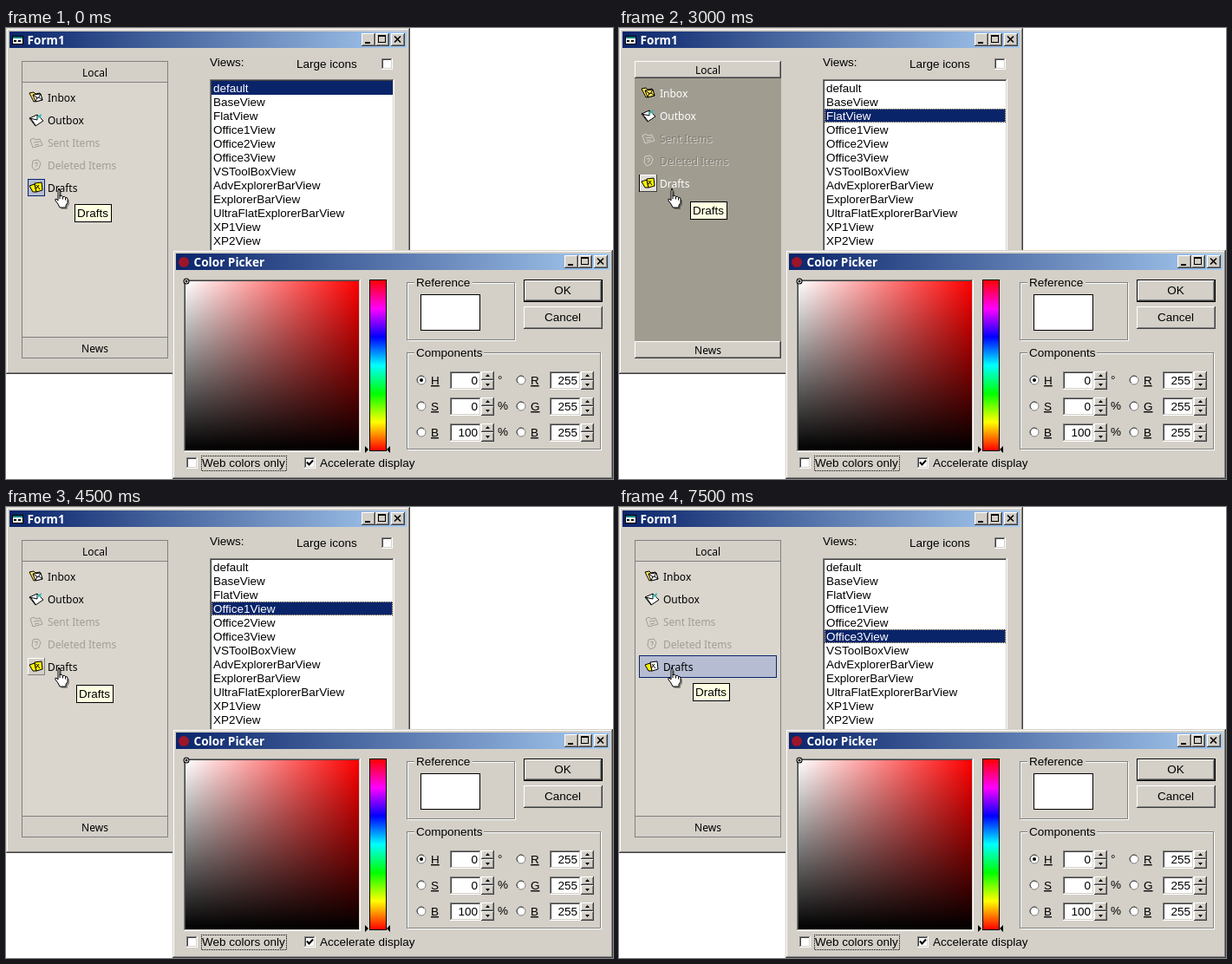
An HTML page for the animation above (8000 ms loop, 700 by 520 pixels).

```html
<!DOCTYPE html>
<html lang="en">
<head>
<meta charset="utf-8">
<title>Sidebar views</title>
<style>
html, body { margin: 0; width: 100%; height: 100%; overflow: hidden; background: #fff; }
svg { display: block; width: 700px; height: 520px; }
rect { shape-rendering: crispEdges; }
text { font: 13.5px "Liberation Sans", Arial, sans-serif; white-space: pre; }
.title { font: bold 13.6px "Noto Sans", sans-serif; fill: #fff; }
.side { font: 12px "Noto Sans", sans-serif; }
.state { visibility: hidden; animation: slot 8s step-end infinite; }
.state:last-child { animation-name: tail; }
@keyframes slot { 0% { visibility: visible } 18.75%, 100% { visibility: hidden } }
@keyframes tail { 0% { visibility: visible } 6.25%, 100% { visibility: hidden } }
</style>
</head>
<body>
<svg id="stage" viewBox="0 0 700 520">
  <defs>
    <linearGradient id="bar"><stop stop-color="#0a246a"/><stop offset="1" stop-color="#a6caf0"/></linearGradient>
    <linearGradient id="red"><stop stop-color="#fff"/><stop offset="1" stop-color="#f00"/></linearGradient>
    <linearGradient id="dark" x2="0" y2="1"><stop stop-opacity="0"/><stop offset="1"/></linearGradient>
    <linearGradient id="hue" x2="0" y2="1"></linearGradient>
    <pattern id="dots" width="2" height="2" patternUnits="userSpaceOnUse">
      <path d="M0 0h1v1h-1ZM1 1h1v1h-1Z"/>
    </pattern>
    <pattern id="focusDots" width="2" height="2" patternUnits="userSpaceOnUse">
      <path d="M0 0h1v1h-1ZM1 1h1v1h-1Z" fill="#f5db95"/>
    </pattern>
  </defs>
  <g id="form"></g>
  <g id="states"></g>
  <g id="picker"></g>
</svg>
<script>
const FACE = '#d4d0c8', GREY = '#808080', DARK = '#404040', NAVY = '#0a246a', BLACK = '#000', WHITE = '#fff';
const byId = id => document.getElementById(id);

const rect = (x, y, w, h, fill) =>
  `<rect x="${x}" y="${y}" width="${w}" height="${h}" fill="${fill}"/>`;
const path = (d, fill, stroke = 'none', extra = '') =>
  `<path d="${d}" fill="${fill}" stroke="${stroke}" ${extra}/>`;
const circle = (x, y, r, fill, stroke = 'none') =>
  `<circle cx="${x}" cy="${y}" r="${r}" fill="${fill}" stroke="${stroke}"/>`;
const text = (x, y, s, extra = '') => `<text x="${x}" y="${y}" ${extra}>${s}</text>`;
const centred = (x, y, s, extra = '') => text(x, y, s, `text-anchor="middle" ${extra}`);
const at = (x, y, content) => `<g transform="translate(${x} ${y})">${content}</g>`;
const outline = (x, y, w, h, stroke, fill = 'none') => rect(x, y, w, h, fill) +
  rect(x, y, w, 1, stroke) + rect(x, y + h - 1, w, 1, stroke) +
  rect(x, y + 1, 1, h - 2, stroke) + rect(x + w - 1, y + 1, 1, h - 2, stroke);

// One-pixel edge: light on the top and left, shade on the bottom and right.
const bevel = (x, y, w, h, light, shade, fill = FACE) =>
  rect(x, y, w, h, shade) + rect(x, y, w - 1, h - 1, light) + rect(x + 1, y + 1, w - 2, h - 2, fill);
const raised = (x, y, w, h) =>
  bevel(x, y, w, h, WHITE, DARK) + bevel(x + 1, y + 1, w - 2, h - 2, FACE, GREY);
const sunken = (x, y, w, h, fill = WHITE) =>
  bevel(x, y, w, h, GREY, WHITE) + bevel(x + 1, y + 1, w - 2, h - 2, DARK, FACE, fill);

function captionButtons(right, y) {
  const glyphs = [
    rect(4, 10, 6, 2, BLACK),
    outline(3, 2, 9, 9, BLACK) + rect(3, 2, 9, 2, BLACK),
    path('M4 3.5 11 10.5M11 3.5 4 10.5', 'none', BLACK, 'stroke-width="1.7"')
  ];
  return glyphs.map((glyph, i) =>
    at(right - [50, 34, 16][i], y, raised(0, 0, 16, 15) + glyph)).join('');
}

function windowFrame(x, y, w, h, title, icon) {
  return bevel(x, y, w, h, FACE, DARK) + bevel(x + 1, y + 1, w - 2, h - 2, WHITE, GREY) +
    rect(x + 4, y + 4, w - 8, 19, 'url(#bar)') + at(x + 6, y + 6, icon) +
    text(x + 24.5, y + 18.5, title, 'class="title"') + captionButtons(x + w - 6, y + 6);
}

const checkbox = (x, y, on) => sunken(x, y, 13, 13) +
  (on ? path(`M${x + 3} ${y + 5.5}l2.5 3 4.5-5`, 'none', BLACK, 'stroke-width="2"') : '');

const formIcon = outline(1, 3, 13, 10, BLACK, WHITE) + rect(2, 4, 11, 2, '#008080') +
  rect(3, 8, 3, 2, BLACK) + rect(8, 8, 3, 2, BLACK);

const viewNames = ['default', 'BaseView', 'FlatView', 'Office1View', 'Office2View', 'Office3View',
  'VSToolBoxView', 'AdvExplorerBarView', 'ExplorerBarView', 'UltraFlatExplorerBarView', 'XP1View', 'XP2View'];
const viewName = (i, fill) => text(239, 74 + 16 * i, viewNames[i], `fill="${fill}"`);

byId('form').innerHTML = windowFrame(0, 0, 466, 399, 'Form1', formIcon) +
  text(235, 44, 'Views:') + text(335, 46, 'Large icons') + checkbox(433, 35) +
  sunken(235, 59, 213, 220) + viewNames.map((_, i) => viewName(i, BLACK)).join('');

// Sidebar icons on a 16 by 16 grid.
const YELLOW = '#fff200', PALE_YELLOW = '#ffe45c';
function itemIcon(kind, ink, paper, back = paper) {
  const shape = (d, fill = paper) => path(d, fill, ink, 'stroke-linejoin="round"');
  const parts = {
    inbox: () => shape('M0 3 5 2 7 4 12 3 15 11 5 13Z', back) + shape('M4 5 13 4 15 11 7 13Z') +
      path('M4 5 10 9 13 4M7 13 9 8M15 11 11 8', 'none', ink),
    outbox: () => shape('M0 6 9 2 16 9 7 15Z') + path('M0 6 9 8 9 2', 'none', ink) +
      path('M9 4 14 1 13 6 11 5 9 8Z', '#38b5b0') + path('M2 7 7 14', 'none', ink),
    sent: () => shape('M1 5 5 3 7 5 12 4 15 11 4 14Z') + path('M5 8 12 7M6 11 11 10', 'none', ink),
    deleted: () => shape('M4 3 10 2 13 6 11 12 6 14 3 10Z') + path('M6 6 9 5 9 8 7 10', 'none', ink),
    drafts: () => shape('M0 6 6 4 8 13 4 13Z', back) + shape('M6 3 14 2 15 11 8 13Z') +
      path('M8 5 12 10M8 9 11 5', 'none', ink)
  };
  return parts[kind]();
}

const items = [['inbox', 'Inbox'], ['outbox', 'Outbox'], ['sent', 'Sent Items'],
  ['deleted', 'Deleted Items'], ['drafts', 'Drafts']];

function sidebar(solid, textX, draftPaper) {
  const top = solid ? 75 : 80;
  const papers = { inbox: [solid ? PALE_YELLOW : WHITE, PALE_YELLOW], outbox: [WHITE], drafts: [draftPaper, YELLOW] };
  return items.map(([kind, label], i) => {
    const y = top + 26 * i, off = !papers[kind];
    const ink = off ? (solid ? '#d4d0c8' : '#a19d96') : BLACK;
    const fill = off ? (solid ? '#827e76' : '#a19d96') : solid ? WHITE : BLACK;
    const emboss = off && solid ? text(textX + 1, y + 5.5, label, 'class="side" fill="#d8d5ce"') : '';
    return at(textX - 21, y - 8, itemIcon(kind, ink, ...(papers[kind] || ['none']))) + emboss +
      text(textX, y + 4.5, label, `class="side" fill="${fill}"`);
  }).join('');
}

function panel(solid) {
  const h = solid ? 20 : 25, end = 381;
  const header = (y, label) =>
    (solid ? raised(18, y, 169, h) : outline(18, y, 169, h, GREY, FACE)) +
    centred(102.5, y + h / 2 + 5, label, 'class="side"');
  return outline(18, 38, 169, end - 38, solid ? '#a09c90' : GREY, solid ? '#a09c90' : '#dad6ce') +
    header(38, 'Local') + header(end - h, 'News');
}

const hand = 'M5 1.5q2 0 2 2v6q3-1 3.5 1 2.5-1 3 1 2.5-.5 2.5 2v4l-2 3v2.5h-7l-2-4-3-4q-1-2 1-2l2 2v-11q0-2 2-2Z';
const cursor = at(55, 184,
  path(hand, BLACK, 'none', 'transform="translate(2 2)" opacity=".35"') +
  path(hand, WHITE, BLACK) + path('M7 9v4M10.5 10.5v3M13.5 11.5v3', 'none', BLACK));

const tooltip = (x, y) => outline(x, y, 43, 21, BLACK, '#ffffe1') + text(x + 3, y + 15, 'Drafts');

const selection = i => rect(237, 61 + 16 * i, 209, 16, NAVY) +
  (i ? outline(237, 61 + 16 * i, 209, 16, 'url(#focusDots)') : '') + viewName(i, WHITE);

const marked = outline(25, 174, 20, 20, NAVY, '#b6bdd2');
const lifted = rect(23, 169, 21, 20, BLACK) + bevel(24, 169, 20, 20, WHITE, DARK, '#e1dfd9');
const states = [
  { button: marked, tip: [79, 203] },
  { solid: true, x: 47, button: lifted, tip: [80, 198] },
  { solid: true, x: 47, button: lifted, tip: [82, 200] },
  { button: bevel(25, 174, 20, 20, WHITE, GREY), tip: [81, 205] },
  { button: marked, tip: [78, 204] },
  { x: 51, paper: WHITE, button: outline(23, 171, 159, 26, NAVY, '#b6bdd2'), tip: [85, 203] }
];

byId('states').innerHTML = states.map(({ solid, x = 48, paper = YELLOW, button, tip }, i) =>
  `<g class="state" style="animation-delay:${i * 1.5 - 8}s">` +
  panel(solid) + button + sidebar(solid, x, paper) + tooltip(...tip) + cursor + selection(i) +
  '</g>').join('');

byId('hue').innerHTML = Array.from({ length: 7 }, (_, i) =>
  `<stop offset="${i / 6}" stop-color="hsl(${360 - 60 * i},100%,50%)"/>`).join('');

const group = (x, y, w, h, label, gap) =>
  outline(x + 1, y + 1, w, h, WHITE) + outline(x, y, w, h, GREY) +
  rect(x + 9, y - 2, gap, 5, FACE) + text(x + 11, y + 5, label);

const radio = (x, y, on) => circle(x, y, 5, WHITE, GREY) +
  path(`M${x - 3.5} ${y + 3}a4.6 4.6 0 0 1 6.5-6.5`, 'none', DARK) +
  (on ? circle(x, y, 2, BLACK) : '');

const spinner = (x, y) => raised(x, y, 15, 10) + raised(x, y + 10, 15, 11) +
  path(`M${x + 5} ${y + 6}h5l-2.5-3ZM${x + 5} ${y + 14}h5l-2.5 3Z`, BLACK);

function channel(x, y, label, value, unit = '', on = false) {
  return radio(x, y, on) + text(x + 11, y + 5, label, 'text-decoration="underline"') +
    sunken(x + 33, y - 10, 36, 21) + text(x + 65, y + 5, value, 'text-anchor="end"') +
    spinner(x + 69, y - 10) + text(x + 88, y + 4, unit);
}

const pushButton = (y, label, isDefault) =>
  (isDefault ? outline(597, y, 91, 26, BLACK) + raised(598, y + 1, 89, 24) : raised(597, y, 91, 26)) +
  centred(642, y + 17, label);

byId('picker').innerHTML =
  windowFrame(192, 256, 508, 264, 'Color Picker', circle(7, 8, 6, '#9c1528')) +
  sunken(205, 290, 204, 199) +
  rect(207, 292, 200, 195, 'url(#red)') + rect(207, 292, 200, 195, 'url(#dark)') +
  circle(208, 292, 3.5, BLACK) + circle(208, 292, 2, BLACK, WHITE) +
  outline(419, 290, 20, 198, BLACK) + rect(420, 291, 18, 196, 'url(#hue)') +
  path('M414 482v8l4-4ZM443 482v8l-4-4Z', BLACK) +
  group(462, 293, 125, 67, 'Reference', 67) + outline(478, 307, 69, 42, BLACK, WHITE) +
  pushButton(290, 'OK', true) + pushButton(321, 'Cancel') +
  group(462, 374, 224, 112, 'Components', 80) +
  channel(479, 406, 'H', '0', '°', true) + channel(479, 436, 'S', '0', '%') +
  channel(479, 466, 'B', '100', '%') +
  ['R', 'G', 'B'].map((label, i) => channel(594, 406 + 30 * i, label, '255')).join('') +
  checkbox(208, 495) + text(226, 506, 'Web colors only') +
  outline(225, 493, 99, 18, 'url(#dots)') +
  checkbox(344, 495, true) + text(362, 506, 'Accelerate display');
</script>
</body>
</html>
```
